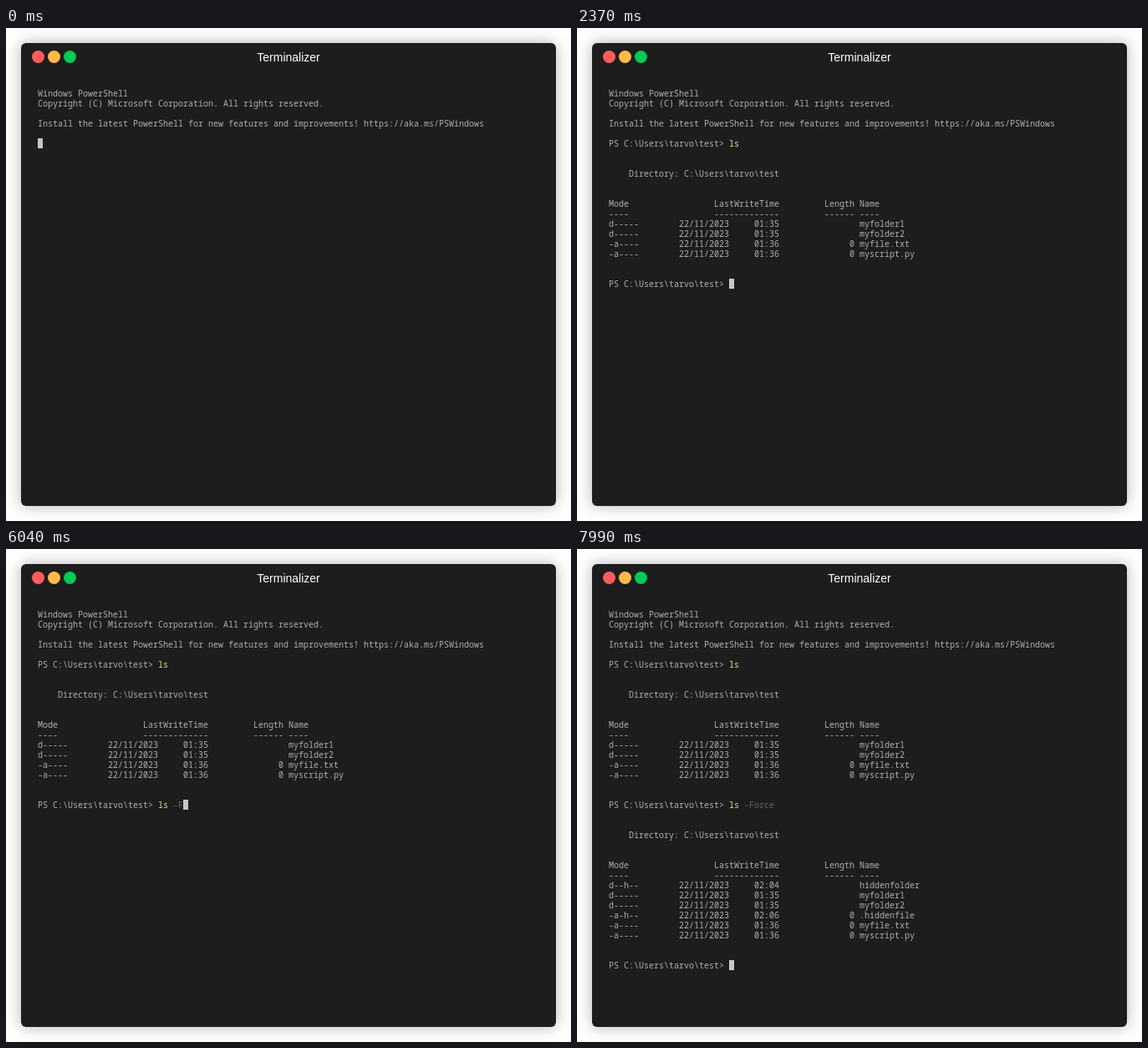
Animation, 676 px wide and 590 px high, one loop 9.78 s. Source, as an HTML page:

```html
<!DOCTYPE html>
<html lang="en">
<head>
<meta charset="utf-8">
<title>Terminal</title>
<style>
  html, body { margin: 0; width: 100%; height: 100%; overflow: hidden; background: #fff; }
  #window {
    position: absolute; left: 18px; top: 18px; width: 640px; height: 554px;
    border-radius: 6px; background: #1d1d1d; box-shadow: 0 0 18px rgba(0, 0, 0, .3);
  }
  .dot { position: absolute; top: 9px; width: 15px; height: 15px; border-radius: 50%; }
  #title {
    position: absolute; top: 9px; width: 100%; text-align: center; color: #fff;
    font: 14px/16px "Liberation Sans", Arial, sans-serif;
  }
  #screen {
    position: absolute; left: 20px; top: 54px; margin: 0; color: #afafaf;
    font: 10px/12px "Noto Sans Mono", "DejaVu Sans Mono", monospace;
    font-variant-ligatures: none;
  }
  #screen i { font-style: normal; color: #ebdf86; }
  #screen b { font-weight: normal; color: #626566; }
  #cursor { position: absolute; width: 6px; height: 12px; background: #c7c7c7; }
</style>
</head>
<body>
<div id="window">
  <div class="dot" style="left:13px;background:#ff5d5b"></div>
  <div class="dot" style="left:32px;background:#ffbb4a"></div>
  <div class="dot" style="left:51px;background:#00ca56"></div>
  <div id="title">Terminalizer</div>
  <pre id="screen"></pre>
  <div id="cursor"></div>
</div>
<script>
const LOOP = 9780, CELL = 6, LINE = 12;
const path = 'C:\\Users\\tarvo\\test';
const prompt = `PS ${path}> `;

const row = (mode, date, time, size, name) =>
  mode.padEnd(14) + date.padEnd(10) + time.padStart(10) + size.padStart(15) + ' ' + name + '\n';
const file = (mode, time, name) =>
  row(mode, '22/11/2023', time, mode[0] === 'd' ? '' : '0', name);

const directory = `\n\n\n    Directory: ${path}\n\n\n`;
const header = row('Mode', '', 'LastWriteTime'.slice(3), 'Length', 'Name').replace('       tWriteTime', '    LastWriteTime')
  .replace(/^Mode.*/, 'Mode' + 'LastWriteTime'.padStart(30) + 'Length'.padStart(15) + ' Name');
const table = header + header.trimEnd().replace(/\w/g, '-') + '\n';
const folders = file('d-----', '01:35', 'myfolder1') + file('d-----', '01:35', 'myfolder2');
const files = file('-a----', '01:36', 'myfile.txt') + file('-a----', '01:36', 'myscript.py');
const hiddenFolder = file('d--h--', '02:04', 'hiddenfolder');
const hiddenFile = file('-a-h--', '02:06', '.hiddenfile');

// Each entry appends its text at the given time.
const steps = [
  [0, 'Windows PowerShell\nCopyright (C) Microsoft Corporation. All rights reserved.\n\n' +
      'Install the latest PowerShell for new features and improvements! https://aka.ms/PSWindows\n\n'],
  [110, prompt], [1640, 'l'], [1910, 's'],
  [2310, directory], [2330, table], [2350, folders + files], [2370, '\n\n' + prompt],
  [3840, 'l'], [4150, 's'], [4680, ' '], [5300, '-'], [6040, 'F'],
  [6540, 'o'], [6780, 'r'], [7110, 'c'], [7270, 'e'],
  [7970, directory + table + hiddenFolder + folders + hiddenFile + files],
  [7990, '\n\n' + prompt]
];

const screen = document.getElementById('screen');
const cursor = document.getElementById('cursor');
let shown;

function draw() {
  const t = performance.now() % LOOP;
  const text = steps.filter(([at]) => at <= t).map(([, part]) => part).join('');
  if (text !== shown) {
    shown = text;
    screen.innerHTML = text.replace(/> (ls?)( -\w*)?/g, '> <i>$1</i><b>$2</b>');
    const lines = text.split('\n');
    cursor.style.left = 20 + lines.at(-1).length * CELL + 'px';
    cursor.style.top = 54 + (lines.length - 1) * LINE + 'px';
  }
  requestAnimationFrame(draw);
}
draw();
</script>
</body>
</html>
```
